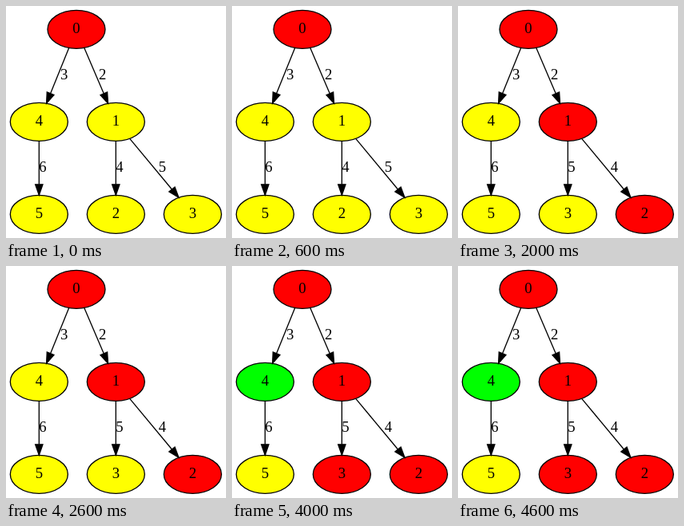
An HTML page for the animation above (5 s loop, 275 px wide and 291 px high).

```html
<!DOCTYPE html>
<html lang="en">
<head>
<meta charset="utf-8">
<title>Tree traversal</title>
<style>
  html, body { margin: 0; width: 100%; height: 100%; overflow: hidden; background: #fff; }
  svg { display: block; }
  text { font: 18.667px "Liberation Serif", "Times New Roman", serif; text-anchor: middle; }
  .nodes { fill: #ff0; stroke: #000; stroke-width: 1.333; }
  .edges { fill: none; stroke: #000; stroke-width: 1.333; }

  .n1, .right, .mid, .n4, .before, .after { animation: 5s step-end infinite; }
  .n1 { animation-name: visit1; }
  .right { animation-name: visitRight; }
  .mid { animation-name: visitMid; }
  .n4 { animation-name: visit4; }
  .before { animation-name: leave; }
  .after { animation-name: enter; }

  @keyframes visit1 { 0% { fill: #ff0; } 20%, 100% { fill: #f00; } }
  @keyframes visitRight { 0% { fill: #ff0; } 40%, 100% { fill: #f00; } }
  @keyframes visitMid { 0% { fill: #ff0; } 60%, 100% { fill: #f00; } }
  @keyframes visit4 { 0% { fill: #ff0; } 80%, 100% { fill: #0f0; } }
  @keyframes leave { 0% { visibility: visible; } 20%, 100% { visibility: hidden; } }
  @keyframes enter { 0% { visibility: hidden; } 20%, 100% { visibility: visible; } }
</style>
</head>
<body>
<svg width="275" height="291" viewBox="0 0 275 291">
  <defs>
    <ellipse id="node" rx="36" ry="24"/>
    <marker id="tip" markerUnits="userSpaceOnUse" markerWidth="20" markerHeight="16"
            refX="0" refY="0" orient="auto" overflow="visible">
      <path d="M0,-4.667L13.333,0L0,4.667Z" stroke="#000" stroke-width="1.333"/>
    </marker>
  </defs>

  <g class="nodes">
    <use href="#node" x="88" y="29.33" fill="#f00"/>
    <use href="#node" x="41.33" y="145.33" class="n4"/>
    <use href="#node" x="137.33" y="145.33" class="n1"/>
    <use href="#node" x="41.33" y="261.33"/>
    <use href="#node" x="137.33" y="261.33" class="mid"/>
    <use href="#node" x="233.33" y="261.33" class="right"/>
  </g>

  <g class="edges" marker-end="url(#tip)">
    <path d="M78.7,52.5L55.6,109.8" marker-end="url(#tip)"/>
    <path d="M97.8,52.4L122.3,109.9" marker-end="url(#tip)"/>
    <path d="M41.33,169.5V223.8" marker-end="url(#tip)"/>
    <path d="M137.33,169.5V223.8" marker-end="url(#tip)"/>
    <path d="M154.7,166.4L207.4,230" marker-end="url(#tip)"/>
  </g>

  <text x="88" y="34.27">0</text>
  <text x="41.33" y="150.27">4</text>
  <text x="137.33" y="150.27">1</text>
  <text x="41.33" y="266.27">5</text>
  <text x="72.67" y="92.27">3</text>
  <text x="120.67" y="92.27">2</text>
  <text x="46" y="208.27">6</text>

  <!-- the two children of node 1 trade places -->
  <g class="before">
    <text x="142" y="208.27">4</text>
    <text x="195.5" y="208.27">5</text>
    <text x="137.33" y="266.27">2</text>
    <text x="233.33" y="266.27">3</text>
  </g>
  <g class="after">
    <text x="142" y="208.27">5</text>
    <text x="195.5" y="208.27">4</text>
    <text x="137.33" y="266.27">3</text>
    <text x="233.33" y="266.27">2</text>
  </g>
</svg>
</body>
</html>
```
